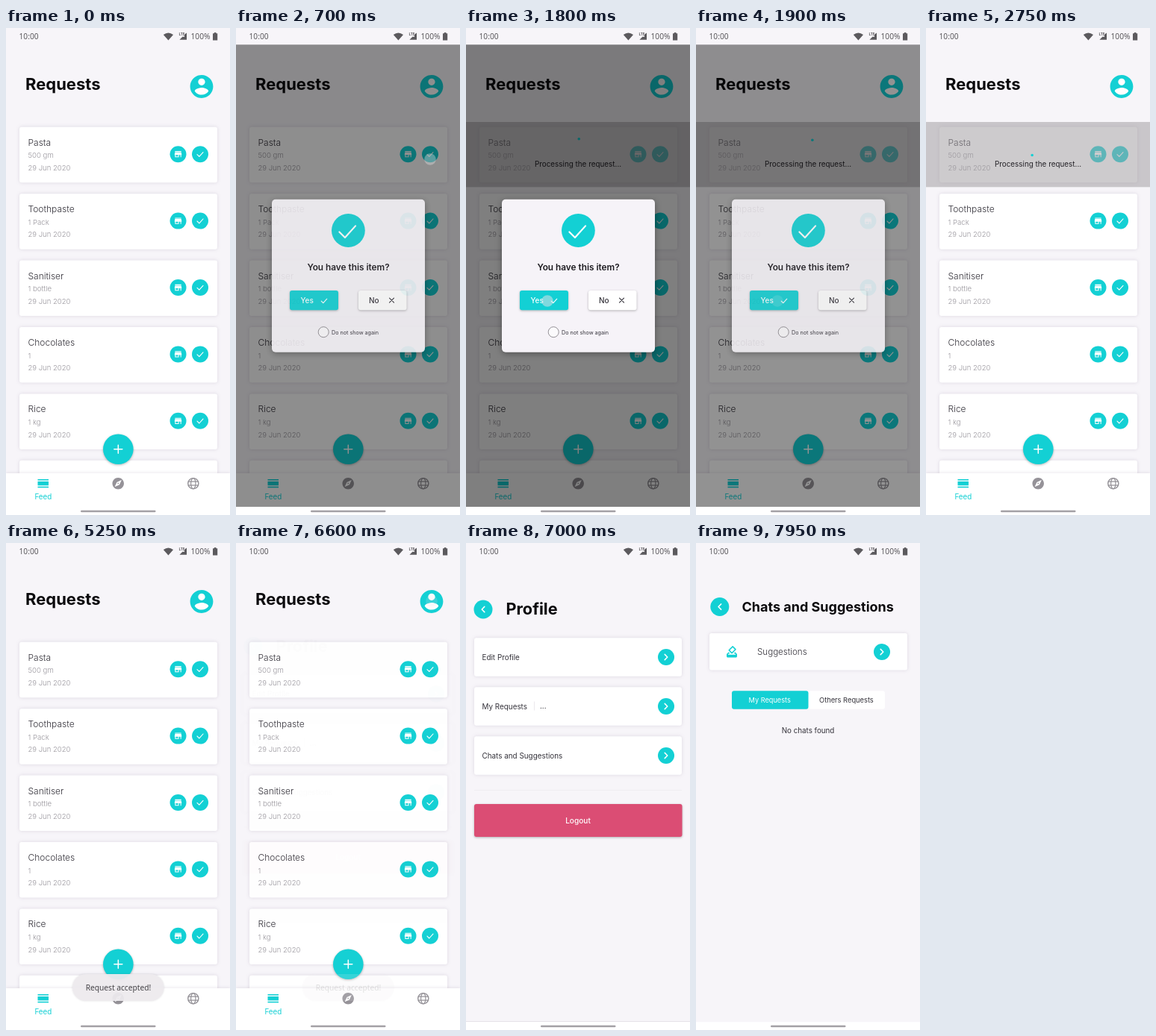
An HTML page that plays this animation: 300 px wide and 653 px high, repeating every 8 s.

```html
<!DOCTYPE html>
<html lang="en">
<head>
<meta charset="utf-8">
<title>Requests</title>
<style>
  html, body { margin: 0; width: 100%; height: 100%; overflow: hidden; background: #f7f5f9; }
  svg { display: block; width: 100vw; height: 100vh; font-family: Inter, sans-serif; }
  .system { font-family: "Noto Sans", sans-serif; }
  .card { fill: #fff; filter: drop-shadow(0 0 2.5px rgba(80, 65, 100, .16)); }
  .raised { filter: drop-shadow(0 1px 1.5px rgba(0, 0, 0, .28)); }
  .line { fill: none; stroke-linecap: round; stroke-linejoin: round; }
</style>
</head>
<body>
<svg id="stage" viewBox="0 0 300 653"></svg>
<script>
const TEAL = '#13d0d4', PAGE = '#f7f5f9', INK = '#34323a', MUTED = '#99969d', GRAY = '#959298';
const LOOP = 8000;

const ICONS = {
  store: 'M20 4H4v2h16V4zm1 10v-2l-1-5H4l-1 5v2h1v6h10v-6h4v6h2v-6h1zm-9 4H6v-4h6v4z',
  account: 'M12 2C6.48 2 2 6.48 2 12s4.48 10 10 10 10-4.48 10-10S17.52 2 12 2zm0 3c1.66 0 3 1.34 3 3s-1.34 3-3 3-3-1.34-3-3 1.34-3 3-3zm0 14.2c-2.5 0-4.71-1.28-6-3.22.03-1.99 4-3.08 6-3.08 1.99 0 5.97 1.09 6 3.08-1.29 1.94-3.5 3.22-6 3.22z',
  compass: 'M12 10.9c-.61 0-1.1.49-1.1 1.1s.49 1.1 1.1 1.1c.61 0 1.1-.49 1.1-1.1s-.49-1.1-1.1-1.1zM12 2C6.48 2 2 6.48 2 12s4.48 10 10 10 10-4.48 10-10S17.52 2 12 2zm2.19 12.19L6 18l3.81-8.19L18 6l-3.81 8.19z',
  ballot: 'M18 13h-.68l-2 2h1.91L19 17H5l1.78-2h2.05l-2-2H6l-3 3v4c0 1.1.89 2 1.99 2H19c1.1 0 2-.89 2-2v-4l-3-3zm-1-5.05l-4.95 4.95-3.54-3.54 4.95-4.95L17 7.95zm-4.24-5.66L6.39 8.66c-.39.39-.39 1.02 0 1.41l4.95 4.95c.39.39 1.02.39 1.41 0l6.36-6.36c.39-.39.39-1.02 0-1.41L14.16 2.3c-.38-.4-1.01-.4-1.4-.01z'
};

// Drawing helpers
const rect = (x, y, w, h, fill, r = 0, extra = '') =>
  `<rect x="${x}" y="${y}" width="${w}" height="${h}" rx="${r}" fill="${fill}" ${extra}/>`;
const card = (x, y, w, h) => rect(x, y, w, h, '#fff', 3, 'class="card"');
const disc = (x, y, r, fill = TEAL, extra = '') =>
  `<circle cx="${x}" cy="${y}" r="${r}" fill="${fill}" ${extra}/>`;
const line = (d, color, width) =>
  `<path class="line" d="${d}" stroke="${color}" stroke-width="${width}"/>`;
const text = (x, y, size, label, fill = INK, weight = 400, anchor = 'start', extra = '') =>
  `<text x="${x}" y="${y}" font-size="${size}" fill="${fill}" font-weight="${weight}" text-anchor="${anchor}" ${extra}>${label}</text>`;
const centered = (x, y, size, label, fill, weight) => text(x, y, size, label, fill, weight, 'middle');
const icon = (name, x, y, size, fill) =>
  `<path d="${ICONS[name]}" fill="${fill}" transform="translate(${x - size / 2} ${y - size / 2}) scale(${size / 24})"/>`;
const check = (x, y, s, color, width) =>
  line(`M${x - 4 * s} ${y + .4 * s}l${2.8 * s} ${2.8 * s}l${5.2 * s} ${-5.8 * s}`, color, width);
const chevron = (x, y, dir) => line(`M${x - 1.8 * dir} ${y - 3.6}l${3.6 * dir} 3.6l${-3.6 * dir} 3.6`, '#fff', 1.5);
const nextButton = (x, y) => disc(x, y, 11) + chevron(x, y, 1);
const backButton = (x, y) => disc(x, y, 12.5) + chevron(x, y, -1);
const title = (x, y, size, label) => text(x, y, size, label, '#0b0a0d', 700);
const group = (id, content) => `<g id="${id}">${content}</g>`;

const requestCard = ([name, amount], i) => {
  const y = 132.8 + i * 89.4;
  return card(18, y, 265, 74.5)
    + text(29.5, y + 25, 12, name, INK, 300)
    + text(29.5, y + 41.6, 9.6, amount, MUTED, 300)
    + text(29.5, y + 58.2, 9.5, '29 Jun 2020', MUTED, 300)
    + disc(230.5, y + 36.4, 11) + icon('store', 230.5, y + 36.4, 12.5, '#fff')
    + disc(260, y + 36.4, 11) + check(260, y + 36.4, 1, '#fff', 1.1);
};

const requests = [['Pasta', '500 gm'], ['Toothpaste', '1 Pack'], ['Sanitiser', '1 bottle'],
  ['Chocolates', '1'], ['Rice', '1 kg'], ['', '']];

const feed = title(26, 83, 22, 'Requests')
  + disc(262, 78.5, 14, '#fff') + icon('account', 262, 78.5, 37, TEAL)
  + requests.slice(0, 5).map(requestCard).join('') + card(18, 579.8, 265, 60)
  + rect(0, 597, 300, 56, '#fff', 0, 'class="card"')
  + `<g class="raised">${disc(150.3, 564.8, 20.3)}</g>`
  + line('M144.8 564.8h11M150.3 559.3v11', '#fff', 1.5)
  + rect(42.5, 605, 14.5, 1.6, TEAL) + rect(42.5, 608, 14.5, 5.4, TEAL) + rect(42.5, 614.8, 14.5, 1.6, TEAL)
  + centered(49.8, 632, 9.8, 'Feed', TEAL)
  + icon('compass', 150.2, 610.7, 18.6, GRAY)
  + disc(250.8, 610.7, 7.1, 'none', `stroke="${GRAY}" stroke-width="1.4"`)
  + `<ellipse cx="250.8" cy="610.7" rx="3.2" ry="7.1" fill="none" stroke="${GRAY}" stroke-width="1.2"/>`
  + line('M244.4 608.2h12.8M244.4 613.2h12.8', GRAY, 1.2);

const band = rect(0, 126, 300, 87.3, 'rgba(160,157,161,.53)')
  + centered(150, 186.3, 9.9, 'Processing the request...', '#252328')
  + disc(0, 0, 1.8, TEAL, 'id="spinner"');

const dialog = rect(48, 229.7, 205, 205, '#f6f3f8', 5, 'style="filter:drop-shadow(0 2px 4px rgba(0,0,0,.35))"')
  + disc(150.4, 271.5, 22.4) + check(149.2, 272.4, 2.7, '#fff', 2.2)
  + centered(150.5, 325, 11.8, 'You have this item?', '#1d1b20', 600)
  + rect(72, 352, 65, 26.3, TEAL, 3, 'class="raised"')
  + text(86.5, 368.7, 10, 'Yes', '#fff', 500) + check(118, 365.7, .95, '#fff', 1.1)
  + rect(164, 352, 64.5, 26.3, '#fff', 3, 'class="raised"')
  + text(178, 368.7, 10, 'No', INK, 500) + line('M205.5 362.2l6 6m0-6l-6 6', INK, 1.1)
  + disc(117.2, 407.7, 7, '#fbfafc', 'stroke="#88858b" stroke-width=".9"')
  + text(128, 410.6, 7.2, 'Do not show again', INK);

const profile = rect(0, 0, 300, 642, PAGE)
  + backButton(23, 89) + title(53.5, 96, 21.7, 'Profile')
  + ['Edit Profile', 'My Requests', 'Chats and Suggestions'].map((label, i) => {
      const y = 127.2 + i * 66;
      return card(11, y, 278, 51.5) + text(21.5, y + 29.4, 9.9, label) + nextButton(268, y + 25.8);
    }).join('')
  + rect(91.2, 212.5, .8, 12, '#e6e3e8') + text(99, 222.4, 9.9, '...')
  + rect(11, 331, 278, .8, '#efecf1')
  + rect(11, 350, 278.5, 44, '#db4d74', 3, 'class="raised"')
  + centered(150, 375.5, 10.1, 'Logout', '#fff', 500)
  + rect(0, 641.3, 300, .9, '#dedbe0');

const chats = rect(0, 0, 300, 642.5, PAGE)
  + backButton(31.8, 85.5) + title(61.5, 91.8, 18, 'Chats and Suggestions')
  + card(18, 121, 265, 49.5) + icon('ballot', 48, 145.8, 18.6, TEAL)
  + text(82, 150.4, 11.6, 'Suggestions', INK, 300) + nextButton(249, 146)
  + rect(150, 198.3, 103, 24.4, '#fff', 3) + rect(48, 198.3, 102.5, 24.4, TEAL, 3)
  + centered(98.7, 213.8, 9.2, 'My Requests', '#fff') + centered(201.4, 213.8, 9.3, 'Others Requests')
  + centered(150, 254.6, 9.8, 'No chats found');

const toast = rect(89, 578, 122.5, 36, '#edeaee', 18, 'style="filter:drop-shadow(0 0 1.5px rgba(0,0,0,.12))"')
  + text(150.4, 599.8, 10.2, 'Request accepted!', '#3a383c', 400, 'middle', 'class="system"');

const STATUS = '#5c5a5e';
const statusBar = `<g class="system">${text(17.5, 14.7, 10.2, '10:00', STATUS)}${text(247.5, 14.7, 10.2, '100%', STATUS)}`
  + text(231.5, 10, 4.6, 'LTE', STATUS, 700) + '</g>'
  + `<path d="M210.8 9q6.6-5 13.2 0l-6.6 7.6zM242 6.5v9.3h-9.6l4-4h2.6v-3zM277 7.2h1.8v-1.2h2.6v1.2h1.8v9.3h-6.2z" fill="${STATUS}"/>`;

const stage = document.getElementById('stage');
stage.innerHTML = rect(0, 0, 300, 653, PAGE) + feed
  + group('band', band) + group('dim', rect(0, 22.3, 300, 619.7, '#000')) + group('dialog', dialog)
  + group('profile', profile) + group('chats', chats)
  + group('strip', rect(0, 642.2, 300, 11, '#fff')) + group('toast', toast)
  + statusBar + rect(100, 646.7, 100.5, 2.6, '#a3a0a5', 1.3)
  + disc(0, 0, 7.8, '#e4e3e8', 'id="touch"');

// Motion
const part = id => document.getElementById(id);
const ramp = (t, from, to) => Math.min(1, Math.max(0, (t - from) / (to - from)));
const easeOut = p => 1 - (1 - p) ** 3;
const setOpacity = (id, value) => {
  part(id).setAttribute('opacity', value);
  part(id).style.display = value > 0 ? '' : 'none';
};
const move = (id, x, y) => part(id).setAttribute('transform', `translate(${x} ${y})`);

const touches = [
  { x: 260, y: 176, down: 60, up: 600 },
  { x: 109, y: 366, down: 1400, up: 1740 },
  { x: 262, y: 78, down: 6150, up: 6450 },
  { x: 252, y: 286, down: 7380, up: 7520 }
];

function openPage(id, t, start) {
  const p = easeOut(ramp(t, start, start + 320));
  setOpacity(id, p);
  move(id, 0, 50 * (1 - p));
}

function render(t) {
  const modal = ramp(t, 480, 730) * (1 - ramp(t, 1860, 2150));
  setOpacity('dim', .5 * modal);
  setOpacity('dialog', modal);

  setOpacity('band', t >= 1750 && t < 4650 ? 1 : 0);
  const angle = (t - 1775) / 1600 * 2 * Math.PI;
  move('spinner', 150 + 12.3 * Math.sin(angle), 161 - 12.3 * Math.cos(angle));

  setOpacity('toast', .94 * ramp(t, 4750, 5050) * (1 - ramp(t, 6350, 6650)));
  openPage('profile', t, 6600);
  openPage('chats', t, 7600);
  setOpacity('strip', t >= 6600 ? 1 : 0);

  const touch = touches.find(({ down, up }) => t >= down && t < up + 200);
  if (touch) move('touch', touch.x, touch.y);
  setOpacity('touch', touch ? .75 * ramp(t, touch.down, touch.down + 60) * (1 - ramp(t, touch.up, touch.up + 200)) : 0);
}

const begin = performance.now();
function tick() {
  render((performance.now() - begin) % LOOP);
  requestAnimationFrame(tick);
}
tick();
</script>
</body>
</html>
```
